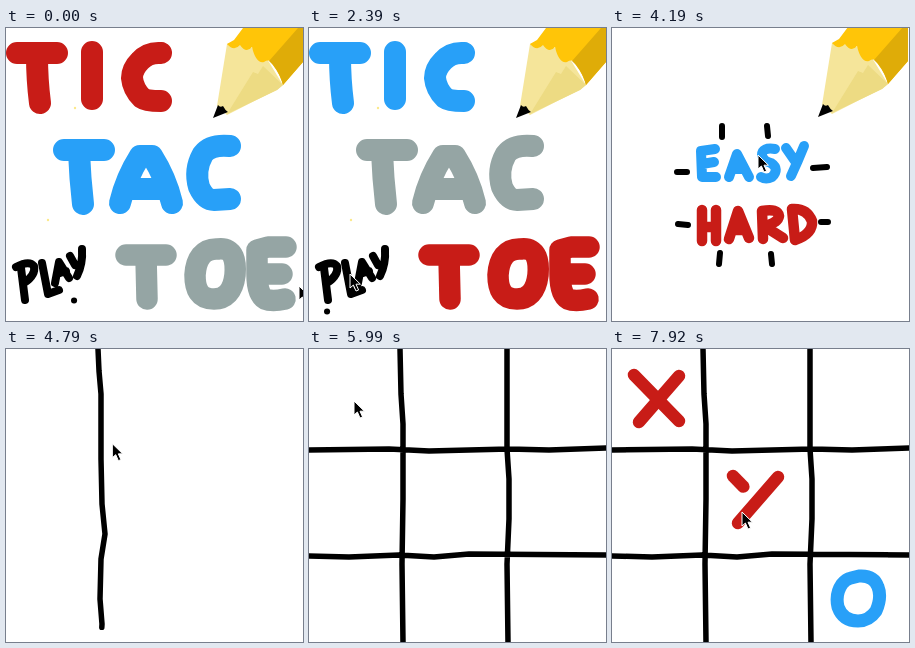
Write an HTML page that moves like this. It is 297 px wide and 293 px high and loops after 8 s.

```html
<!DOCTYPE html>
<html lang="en">
<head>
<meta charset="utf-8">
<title>Tic Tac Toe</title>
<style>
  html, body { margin: 0; width: 100%; height: 100%; overflow: hidden; background: #fff; }
  svg { display: block; width: 100vw; height: 100vh; }
  .line { fill: none; stroke-linecap: round; stroke-linejoin: round; }
</style>
</head>
<body>
<svg id="stage" viewBox="0 0 297 293" preserveAspectRatio="none">
  <defs>
    <g id="pencil">
      <path fill="#f5e59a" d="M221 16L230 12L258 26L277 57L271 62Q246 74 221 87L211 78Z"/>
      <path fill="#eddb83" d="M221 86L247 44L252 46L257 38L277 57L271 62Q246 74 221 86Z"/>
      <path fill="#ffc508" d="M221 16L228 12L237 0H297V34L277 57Q274 46 267 37Q264 30 258 34Q250 36 246 19Q240 26 234 17Q228 24 221 16Z"/>
      <path fill="#dfac08" d="M263 33L292 0H297V34L277 57Q274 46 267 37Z"/>
      <path d="M207 90L212 77Q214 80 217 78Q219 82 222 84Z"/>
    </g>
  </defs>

  <g id="title">
    <g fill="#fbe98c"><circle cx="42" cy="192" r="1.2"/><circle cx="69" cy="80" r="1.2"/></g>
    <use href="#pencil"/>
  </g>
  <g id="menu"><use href="#pencil" x="-1" y="-1"/></g>
  <g id="board"></g>
  <path id="cursor" d="M0 0V14L3.4 11L6 17L8.6 16L6 10.2H10.4Z" stroke="#fff" stroke-width="1"/>
</svg>
<script>
const LOOP = 8000, STEP = 149.6;
const RED = '#c81c17', BLUE = '#28a0f8', GRAY = '#95a5a4', BLACK = '#000';
const byId = id => document.getElementById(id);
const title = byId('title'), menu = byId('menu'), board = byId('board'), cursor = byId('cursor');

function line(parent, d, width, color = BLACK) {
  const el = document.createElementNS('http://www.w3.org/2000/svg', 'path');
  const attrs = { d, class: 'line', 'stroke-width': width, stroke: color };
  for (const name in attrs) el.setAttribute(name, attrs[name]);
  parent.append(el);
  return el;
}

const show = (el, on) => { el.style.display = on ? '' : 'none'; };

// Reveals a stroke from its start; p runs from 0 to 1.
function reveal(el, p) {
  show(el, p > 0);
  if (p >= 1) return el.removeAttribute('stroke-dasharray');
  const length = el.getTotalLength();
  el.setAttribute('stroke-dasharray', `${Math.max(0, p) * length} ${length + 50}`);
}

// Title
const words = [
  line(title, 'M11 25H51M31 27Q31 52 34 75M86 24V71M155 25Q142 24 134 33Q126 41 126 50Q127 61 136 70Q140 73 155 73', 22),
  line(title, 'M58 122H98M73 124Q74 150 77 176M114 175Q120 150 134 128H146Q160 150 166 175M124 161H156M224 118Q205 116 197 126Q188 142 193 159Q199 172 208 172L224 171', 22),
  line(title, 'M120 227H160M140 229L141 271M212 221C229 219 230 235 229 247C227 264 219 271 208 271C193 271 189 261 189 247C190 231 197 220 212 221ZM280 219H262L251 222V246H276M251 246Q251 266 259 271Q266 274 279 271', 21.5)
];
const wordColors = [[RED, BLUE, GRAY], [GRAY, RED, BLUE], [BLUE, GRAY, RED]];
line(title, 'M15 240L19 272M10 239Q23 232 28 238Q30 247 18 255M36 235L42 266L53 262M49 255L53 234L63 250M51 246L60 243M64 228L69 237M76 221Q77 236 71 248', 8);
const dot = line(title, 'M0 0h.1', 6);
const dotPlaces = [[68, 272.5], [43.5, 280.5], [18, 283.5]];

// Difficulty menu
line(menu, 'M103 121L89 123L90 149L104 149M90 136L102 134M117 149L125 126L137 149M121 141H132M163 121Q150 119 150 127Q151 133 159 135Q168 141 160 149Q154 152 149 149M174 120L183 133M192 118Q186 133 179 148', 10, BLUE);
line(menu, 'M90 182V213M104 182V213M91 199H104M117 211L126 183L137 210M121 202H132M150 183L151 211M150 183Q166 180 167 188Q166 195 152 198L171 210M180 181L183 212Q201 206 200 193Q195 180 180 181', 10.5, RED);
const ticks = [
  ['M110 98L110 109M155 98L156 108', 0, 1],
  ['M108 225L107 236M159 226L160 236', 0, -1],
  ['M65 144L75 144M66 196L76 197', 1, 0],
  ['M201 140L215 139M209 194L216 194', -1, 0]
].map(([d, dx, dy]) => ({ el: line(menu, d, 6), dx, dy }));

// Board
const sketch = [
  'M92 0L93 22L95 45L95 110L96 155L99 185L95 210L94 250L96 275L95 293',
  'M198 0L198 120L196 175L199 230L198 293',
  'M0 101L85 101L96 104L165 103L172 102L182 104L200 100L262 101L290 97L297 98',
  'M0 211L47 208L60 209L113 207L200 207L297 206'
].map(d => line(board, d, 5.5));
const grid = line(board, 'M91 0L92 45L94 75L94 150L93 215L94 293M198 0L198 100L200 130L200 170L198 215L199 293M0 101L80 100L120 102L200 100L240 101L297 99M0 207L40 208L90 206L125 208L160 205L297 206', 5.5);

function cross(x, y) {
  return [
    line(board, `M${x + 22} ${y - 23}L${x - 18} ${y + 23}`, 12.5, RED),
    line(board, `M${x - 23} ${y - 24}L${x + 22} ${y + 22}`, 12.5, RED)
  ];
}
const crosses = [{ strokes: cross(45, 50), start: 44 }, { strokes: cross(144, 151), start: 52 }];
const ring = line(board, 'M239 229L247 227Q262 226 266 238Q270 248 264 262Q257 272 246 272Q231 272 226 258Q223 245 230 235Q234 230 239 229', 13, BLUE);

function drawCross({ strokes: [first, second], start }, step) {
  const age = step - start;
  reveal(first, age < 0 ? 0 : age < 1 ? 0.5 : 1);
  reveal(second, age < 1 ? 0 : age < 2 ? 0.23 : 1);
}

// Pointer stops: step, x, y
const stops = [
  [0, 293, 258], [7, 30, 238], [8, 30, 238], [16, 41, 246], [18, 41, 246],
  [22, 78, 212], [27, 146, 127], [30, 146, 127], [36, 27, 30], [39, 27, 30],
  [40, 45, 52], [43, 45, 52], [47, 108, 170], [50, 130, 163], [54, 130, 163]
];
function pointerAt(step) {
  const i = Math.max(1, stops.findIndex(s => s[0] >= step));
  const [a, ax, ay] = stops[i - 1], [b, bx, by] = stops[i];
  const p = (step - a) / (b - a);
  return [ax + (bx - ax) * p, ay + (by - ay) * p];
}

function render(time) {
  const step = Math.floor((time + 10) / STEP);
  show(title, step < 18);
  show(menu, step >= 18 && step < 30);
  show(board, step >= 30);

  const look = step < 5 ? 0 : step < 12 ? 1 : 2;
  words.forEach((word, i) => word.setAttribute('stroke', wordColors[look][i]));
  dot.setAttribute('transform', `translate(${dotPlaces[look]})`);

  const shift = Math.floor((step - 18) / 2) % 2 ? 0 : 2;
  for (const { el, dx, dy } of ticks) {
    el.setAttribute('transform', `translate(${dx * shift} ${dy * shift})`);
  }

  if (step >= 30) {
    const drawn = 3.39 - 0.61 * (36 - step);
    sketch.forEach((el, i) => reveal(el, step < 37 ? Math.min(1, drawn - i) : 0));
    show(grid, step >= 37);
    crosses.forEach(c => drawCross(c, step));
    reveal(ring, step < 47 ? 0 : Math.min(1, 0.055 + (step - 47) * 0.32));
  }
  cursor.setAttribute('transform', `translate(${pointerAt(step)})`);
}

function tick() {
  render(performance.now() % LOOP);
  requestAnimationFrame(tick);
}
tick();
</script>
</body>
</html>
```
